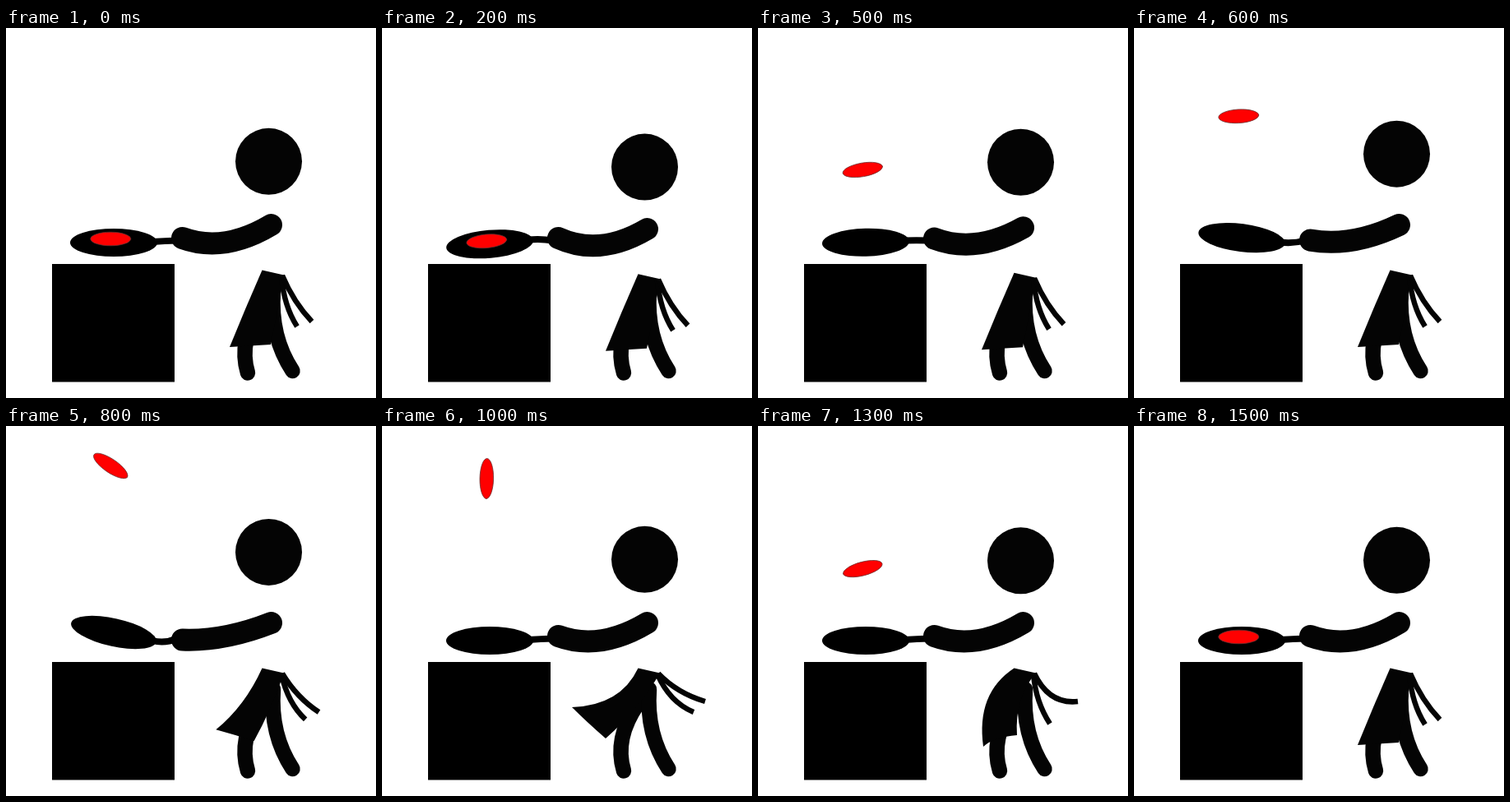
These frames come from a looping animation (450x450 px, 1.6 s). An HTML page with a canvas:

```html
<!DOCTYPE html>
<html lang="en">
<head>
<meta charset="utf-8">
<title>Pancake flip</title>
<style>
  html, body { margin: 0; width: 100%; height: 100%; overflow: hidden; background: #fff; }
  canvas { display: block; width: 100vmin; height: 100vmin; }
</style>
</head>
<body>
<canvas id="stage" width="450" height="450"></canvas>
<script>
const ctx = document.getElementById('stage').getContext('2d');
const STEP = 100, STEPS = 16;
const BLACK = '#000', INK = '#040404';

// Apron key poses: front edge, hem and back edge as quadratic curves
const skirt = {
  rest: [291, 341, 272, 388, 297, 386.5, 322, 385, 330, 345],
  flared: [290, 340, 231, 342, 248, 359, 272, 380, 312, 345],
  curled: [265, 325, 274, 390, 287, 378, 315, 376, 312, 330],
};
// Control point and end of both apron strings
const strings = {
  rest: [338, 338, 354, 363, 350, 334, 372, 357],
  flared: [350, 336, 379, 348, 359, 325, 393, 335],
  curled: [338, 336, 355, 362, 354, 339, 389, 335],
};

const ramp = (t, from, to) => Math.min(1, Math.max(0, (t - from) / (to - from)));
const pulse = (t, from, peak, to) => Math.min(ramp(t, from, peak), 1 - ramp(t, peak, to));
const easeOut = u => Math.sin(u * Math.PI / 2);
const easeInOut = u => (1 - Math.cos(u * Math.PI)) / 2;

function ellipse(x, y, rx, ry, degrees = 0) {
  ctx.beginPath();
  ctx.ellipse(x, y, rx, ry, degrees * Math.PI / 180, 0, Math.PI * 2);
  ctx.fill();
}

function limb(width, cap, x, y, ...curve) {
  ctx.lineWidth = width;
  ctx.lineCap = cap;
  ctx.beginPath();
  ctx.moveTo(x, y);
  ctx.quadraticCurveTo(...curve);
  ctx.stroke();
}

function drawBody(t, dip) {
  limb(18.5, 'round', 311, 338, 282, 380, 294, 419.5);
  limb(18.5, 'round', 325, 320, 321, 375, 348.5, 417);

  const flare = pulse(t, 6, 10, 13) ** 1.3;
  const curl = pulse(t, 10, 13, 15);
  const blend = ({ rest, flared, curled }) => rest.map((v, i) =>
    v + (flared[i] - v) * flare + (curled[i] - v) * curl);

  ctx.save();
  ctx.translate(0, 9.5 * dip);
  const s = blend(skirt);
  ctx.beginPath();
  ctx.moveTo(311.5, 294.5);
  ctx.quadraticCurveTo(...s.slice(0, 4));
  ctx.quadraticCurveTo(...s.slice(4, 8));
  ctx.quadraticCurveTo(s[8], s[9], 338, 300.5);
  ctx.fill();

  const ends = blend(strings);
  limb(6.5, 'butt', 335, 302, ...ends.slice(0, 4));
  limb(6.5, 'butt', 336, 301, ...ends.slice(4));
  ctx.restore();
}

function drawPan(dip, toss) {
  ctx.fillStyle = ctx.strokeStyle = BLACK;
  ellipse(131, 261 + 3.5 * dip - 10 * toss, 53, 17, 12.5 * toss - 10 * dip);
  limb(8, 'butt', 178, 260 - 5 * dip + toss, 193, 259 - 6 * dip + 6 * toss, 208, 258.5);
  ctx.strokeStyle = INK;
  limb(27, 'round', 214.5, 255.5 + 4.5 * toss,
    265, 274 + 9 * dip - 12 * toss, 322.5, 239.5 + 10 * dip);
}

// Quick throw, slower fall, half a turn in the air
function drawPancake(t, dip) {
  const apex = 8.3, span = t < apex ? 4.3 : 6.05;
  const fall = Math.min(1, ((t - apex) / span) ** 2);
  const y = 47.5 + 209 * fall + 5.5 * dip;
  const angle = 190 * easeInOut(ramp(t, 4.8, 14.8)) - 10 * ramp(t, 0, 4);
  ctx.fillStyle = '#f00';
  ellipse(127.3, y, 24.5, 8.3, angle);
  ctx.strokeStyle = '#633';
  ctx.lineWidth = 0.8;
  ctx.stroke();
}

function draw(now) {
  const t = Math.floor(now / STEP) % STEPS;
  const dip = pulse(t, 0, 4, 5.5);
  const toss = easeOut(pulse(t, 4.7, 8, 10));
  const hop = easeOut(pulse(t, 4.5, 6.8, 10));
  const settle = pulse(t, 10, 14, 16);

  ctx.fillStyle = '#fff';
  ctx.fillRect(0, 0, 450, 450);
  ctx.fillStyle = BLACK;
  ctx.fillRect(56, 287, 149, 143.5);

  ctx.fillStyle = ctx.strokeStyle = INK;
  ellipse(319.5, 162.3 + 13.5 * dip - 10.7 * hop + 2 * settle, 40.5, 40.5);
  drawBody(t, dip);
  drawPan(dip, toss);
  drawPancake(t, dip);
}

const start = performance.now();
function tick() {
  draw(performance.now() - start);
  requestAnimationFrame(tick);
}
tick();
</script>
</body>
</html>
```
